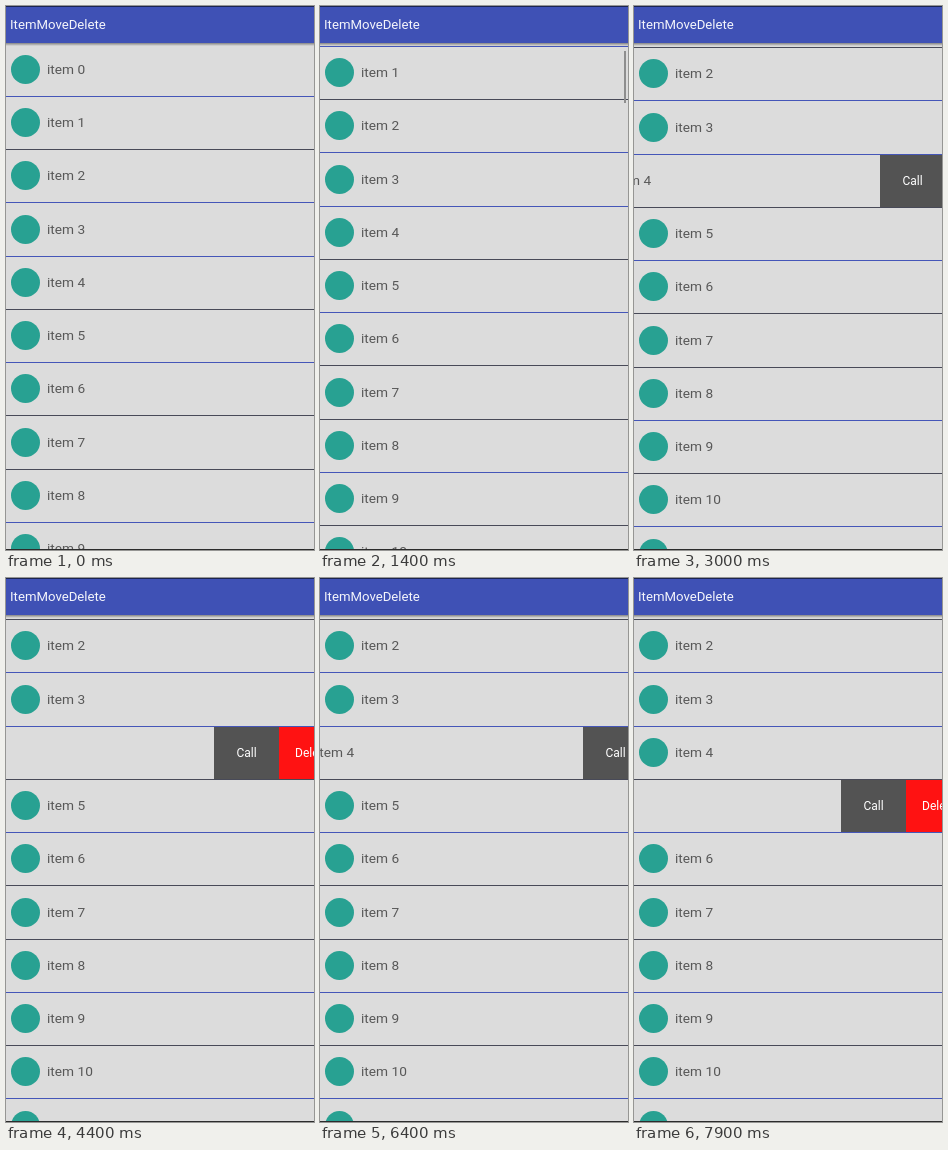
Recreate the animation shown at these times as an HTML page. Size 308 by 544 pixels, loop 8 s.

```html
<!DOCTYPE html>
<html>
<head>
<meta charset="utf-8">
<style>
  html, body { margin: 0; width: 100%; height: 100%; overflow: hidden; }
  body { position: relative; background: #dcdcdc; font-family: Roboto, sans-serif; }
  div { position: absolute; box-sizing: border-box; }
  #stage { width: 308px; height: 544px; overflow: hidden; background: #dcdcdc; }
  #bar {
    width: 308px; height: 37px; background: #3f51b5; border-top: 1px solid #1c2550;
    color: #f4f5fb; font-size: 13.2px; line-height: 36px; padding-left: 4px;
  }
  #shadow { top: 37px; width: 308px; height: 3px; background: linear-gradient(#0006, #0000); }
  #thumb { left: 304px; width: 2px; height: 52px; background: #8e8e8e; }
  #foot { top: 543px; width: 308px; height: 1px; background: #2c2c2c; }
  .row { width: 308px; height: 54px; overflow: hidden; }
  .line { top: 53px; width: 308px; height: 1px; }
  .slide { top: 1px; width: 439px; height: 52px; line-height: 52px; }
  .icon { left: 5px; top: 11px; width: 29px; height: 29px; border-radius: 50%; background: #28a192; }
  .label { left: 41px; top: -1px; font-size: 13.7px; color: #585858; white-space: pre; }
  .button { height: 52px; font-size: 12px; color: #fff; text-align: center; }
  .call { left: 308px; width: 65px; background: #535353; }
  .delete { left: 373px; width: 66px; background: #ff1212; }
</style>
</head>
<body>
<div id="stage">
  <div id="list"></div>
  <div id="thumb"></div>
  <div id="shadow"></div>
  <div id="bar">ItemMoveDelete</div>
  <div id="foot"></div>
</div>
<script>
const LOOP = 8000, STEP = 100, PITCH = 53.25, TOP = 37.25;
const OPEN = 131, HELD = 80, DIP = 62, REST = 45;
const list = document.getElementById('list');
const thumb = document.getElementById('thumb');

const rows = Array.from({ length: 13 }, (_, i) => {
  const row = document.createElement('div');
  row.className = 'row';
  row.innerHTML = `<div class="slide"><div class="icon"></div><div class="label">item ${i}</div>
    <div class="button call">Call</div><div class="button delete">Delete</div></div>
    <div class="line"></div>`;
  list.append(row);
  return { row, slide: row.querySelector('.slide'), line: row.querySelector('.line') };
});

const ramp = (t, from, to) => Math.min(1, Math.max(0, (t - from) / (to - from)));
const ease = (t, from, to) => 1 - (1 - ramp(t, from, to)) ** 2;

const scrollAt = t => 50 * ease(t, 1000, 1400) + 52 * ease(t, 1600, 2000);

// Drag and snap open, pull back and snap open again, drag back, close.
const swipes = {
  4: t => HELD * ramp(t, 2300, 3200) + (OPEN - HELD) * ease(t, 3200, 3400)
    - DIP * ramp(t, 4000, 4800) + DIP * ease(t, 4800, 5300)
    - (OPEN - REST) * ramp(t, 5500, 6400) - REST * ease(t, 6900, 7300),
  5: t => 101 * ramp(t, 7500, 7900)
};

function draw(now) {
  const t = Math.floor(now % LOOP / STEP) * STEP;
  const scroll = scrollAt(t);
  rows.forEach(({ row, slide, line }, i) => {
    const y = Math.floor(TOP + PITCH * i - scroll);
    row.style.top = y + 'px';
    // Dividers look blue on even pixel rows and dark on odd ones.
    line.style.background = y % 2 ? '#4556b8' : '#484a58';
    if (swipes[i]) slide.style.left = -Math.round(swipes[i](t)) + 'px';
  });
  thumb.style.top = Math.round(39 + scroll * 0.118) + 'px';
  thumb.style.opacity = ramp(t, 1000, 1100) - ramp(t, 2300, 2600);
}

const start = performance.now();
function tick() {
  draw(performance.now() - start);
  requestAnimationFrame(tick);
}
tick();
</script>
</body>
</html>
```
